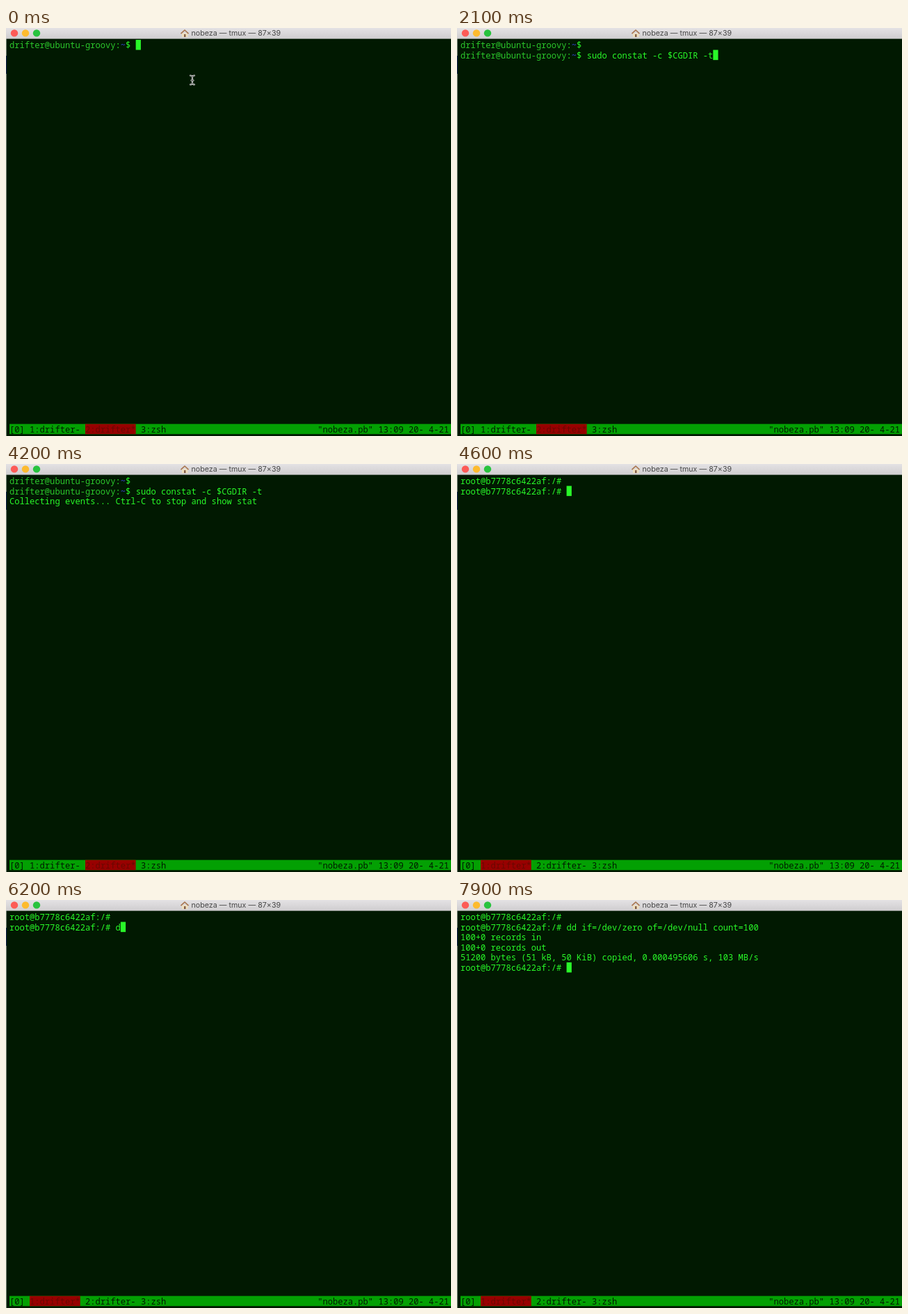
An HTML page that plays this animation: 640x588 px, repeating every 8000 ms.

```html
<!DOCTYPE html>
<html lang="en">
<meta charset="utf-8">
<title>Terminal</title>
<style>
  html, body { margin: 0; height: 100%; overflow: hidden; background: #011901; }
  svg { display: block; width: 640px; height: 588px; }
  text { white-space: pre; font: 12.11px "Noto Sans Mono", "DejaVu Sans Mono", monospace; fill: #29f829; }
  .host { fill: #2cc62c; font-weight: 500; }
  .path { fill: #3a44e0; font-weight: 500; }
  .dark { fill: #011901; }
  .alert { fill: #690800; }
  .title { font: 10.7px Inter, "Open Sans", sans-serif; fill: #484848; }
</style>
<svg viewBox="0 0 640 588">
  <defs>
    <linearGradient id="bar" x2="0" y2="1">
      <stop stop-color="#e4e2e4"/><stop offset="1" stop-color="#cfcdcf"/>
    </linearGradient>
    <path id="beam" d="M265 68.5q2.5 0 3 2 .5-2 3-2M268 70.5v9M265 81.5q2.5 0 3-2 .5 2 3 2M266.5 75.5h3"/>
  </defs>
  <rect width="640" height="588" fill="#011901"/>
  <rect width="1" height="588" fill="#728272"/>
  <path d="M.5 40v26" stroke="#10204a"/>
  <rect width="640" height="15.6" fill="url(#bar)"/>
  <circle cx="12" cy="7.4" r="5.2" fill="#fc5b57"/>
  <circle cx="28" cy="7.4" r="5.2" fill="#fdbb2e"/>
  <circle cx="44" cy="7.4" r="5.2" fill="#28c33e"/>
  <path d="M253 7.5h8.5v5.5h-8.5z" fill="#f0dfbd"/>
  <path d="M256 9h2.5v4H256z" fill="#85604a"/>
  <path d="M251.5 8.2 257 3l5.5 5.2" fill="none" stroke="#a9764f" stroke-width="1.6"/>
  <text class="title" x="266.5" y="11.3">nobeza — tmux — 87×39</text>
  <g id="screen"></g>
  <g id="mouse" fill="none" stroke-linecap="round">
    <use href="#beam" stroke="#eee" stroke-width="2.2"/>
    <use href="#beam" stroke="#333" stroke-width=".7"/>
  </g>
</svg>
<script>
const LOOP = 8000, LEFT = 5, TOP = 17, CW = 7.266, RH = 14.57;
const screenEl = document.getElementById('screen');
const mouse = document.getElementById('mouse');

const USER = 'drifter@ubuntu-groovy:~$ ', ROOT = 'root@b7778c6422af:/# ';
const STAT = 'sudo constat -c $CGDIR -t';
const COLLECT = 'Collecting events... Ctrl-C to stop and show stat';
const DD = 'dd if=/dev/zero of=/dev/null count=100';
const RESULT = ['100+0 records in', '100+0 records out',
  '51200 bytes (51 kB, 50 KiB) copied, 0.000495606 s, 103 MB/s'];

// start time, tmux window, lines, cursor column in the last line (-1 hides it)
const steps = [
  [0, 2, [USER], 25],
  [900, 2, [USER, USER], 25],
  [1400, 2, [USER, USER + STAT], 50],
  [2600, 2, [USER, USER + STAT, ''], 0],
  [2900, 2, [USER, USER + STAT, COLLECT, ''], 0],
  [4000, 2, [USER, USER + STAT, COLLECT], -1],
  [4400, 1, [ROOT, ROOT], 21],
  [5900, 1, [ROOT, ROOT + 'd'], 22],
  [6300, 1, [ROOT, ROOT + DD], 22],
  [7400, 1, [ROOT, ROOT + DD, ...RESULT, ROOT], 21]
];

const cell = (col, row, n, color) =>
  `<rect x="${LEFT + col * CW}" y="${TOP + row * RH}" width="${n * CW}" height="${RH}" fill="${color}"/>`;

const put = (col, row, text, cls = '') =>
  `<text class="${cls}" x="${LEFT + col * CW}" y="${TOP + row * RH + 12}">${text}</text>`;

function line(text, row) {
  if (!text.startsWith(USER)) return put(0, row, text);
  return put(0, row, USER.slice(0, 21), 'host') + put(21, row, ':') +
    put(22, row, '~', 'path') + put(23, row, text.slice(23));
}

function status(win) {
  const at = win === 1 ? 4 : 15;
  const rest = win === 1 ? put(15, 38, '2:drifter- 3:zsh', 'dark')
    : put(4, 38, '1:drifter-', 'dark') + put(26, 38, '3:zsh', 'dark');
  return cell(0, 38, 87.5, '#03a003') + put(0, 38, '[0]', 'dark') + rest +
    cell(at, 38, 10, '#980000') + put(at, 38, win + ':drifter*', 'alert') +
    put(61, 38, '"nobeza.pb" 13:09 20- 4-21', 'dark');
}

let shown;
function draw(now) {
  const t = now % LOOP;
  const step = steps.findLast(s => s[0] <= t);
  mouse.style.display = t < 100 ? '' : 'none';
  if (step !== shown) {
    shown = step;
    const [, win, lines, col] = step;
    screenEl.innerHTML = lines.map(line).join('') + status(win) +
      (col < 0 ? '' : cell(col, lines.length - 1, 1, '#29f829'));
  }
  requestAnimationFrame(draw);
}
draw(0);
</script>
</html>
```
